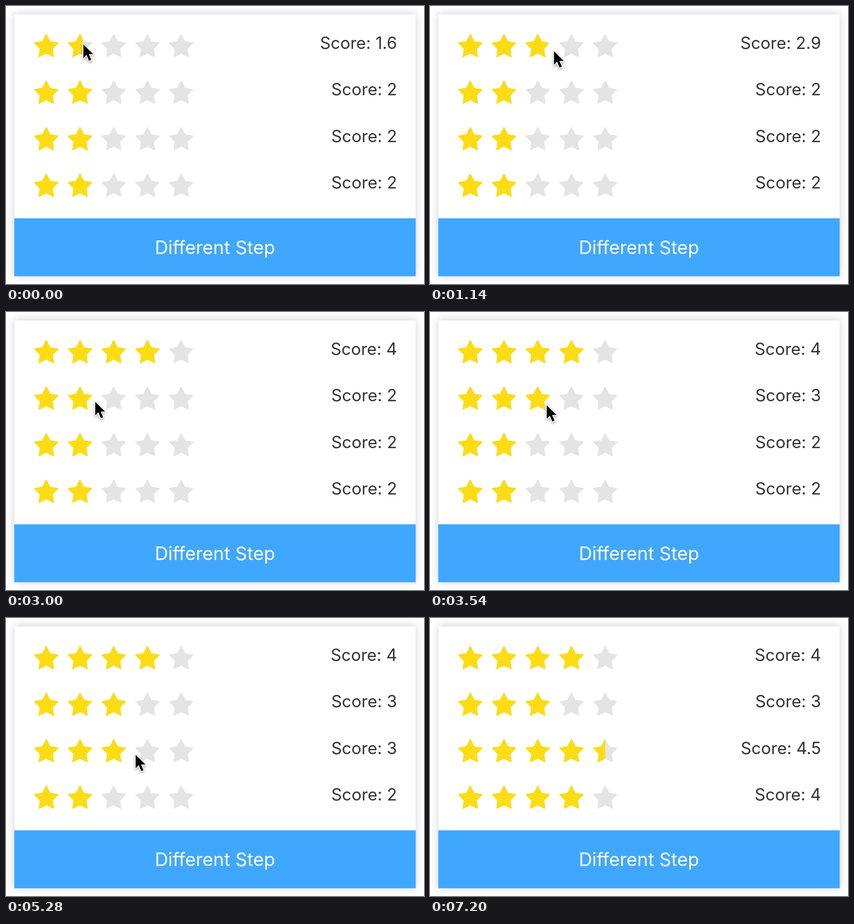
An HTML page for the animation above (7.26 s loop, 740 px wide and 492 px high).

```html
<!DOCTYPE html>
<html lang="en">
<head>
<meta charset="utf-8">
<title>Star rating steps</title>
<style>
  html, body { margin: 0; width: 100%; height: 100%; overflow: hidden; background: #fff; }
  svg { display: block; font-family: Inter, Roboto, sans-serif; }
  .card { fill: #fff; filter: drop-shadow(0 -1px 8px rgba(0, 0, 0, .18)); }
  .star { stroke-width: 2; stroke-linejoin: round; }
  .empty { fill: #e4e4e4; stroke: #e4e4e4; }
  .full { fill: #fddc14; stroke: #fddc14; }
  .score { font-size: 29.6px; fill: #333; text-anchor: end; }
  .label { font-size: 32.7px; fill: #fff; text-anchor: middle; }
  .cursor { fill: #000; stroke: #fff; stroke-width: 3; paint-order: stroke; stroke-linejoin: round;
            filter: drop-shadow(0 2px 2px rgba(0, 0, 0, .35)); }
</style>
</head>
<body>
<svg width="740" height="492" viewBox="0 0 740 492">
  <rect class="card" x="15" y="15" width="710" height="463"/>
  <rect x="14.6" y="375.7" width="710.8" height="102.6" fill="#40a7ff"/>
  <text class="label" x="370" y="439">Different Step</text>
  <g id="rows"></g>
  <path id="cursor" class="cursor" d="M2 2V26L7.5 20.5L12 31L16 29.3L11.6 19.2H19.4Z"/>
</svg>
<script>
const LOOP = 7260, TICK = 60;
const LEFT = 49.8, TOP = 50, PITCH = 59.7, ROW = 82.35, SIZE = 43;
const steps = [0.1, 1, 0.5, 2];

// Turning points of the pointer: time, x, y
const path = [
  [0, 135, 66], [1080, 207, 77], [1140, 217.5, 78], [2160, 284.5, 85],
  [2280, 284, 96], [2760, 165, 128], [3000, 156, 157], [3900, 237, 167],
  [4020, 211, 171], [4080, 204, 184], [4260, 204, 184], [4320, 186, 190],
  [5280, 227.5, 240], [6000, 299, 248], [6240, 299, 248], [6600, 268, 300],
  [6960, 250, 460], [LOOP, 246, 502]
];

function pointer(t) {
  const i = path.findIndex(p => p[0] > t);
  const [t0, x0, y0] = path[i - 1], [t1, x1, y1] = path[i];
  const k = (t - t0) / (t1 - t0);
  return [x0 + (x1 - x0) * k, y0 + (y1 - y0) * k];
}

// Score of the row under the pointer, rounded up to its step
function hover(scores, x, y) {
  const row = Math.floor((y - TOP) / ROW), star = Math.floor((x - LEFT) / PITCH);
  const dx = x - LEFT - star * PITCH, dy = y - TOP - row * ROW;
  if (row < 0 || row > 3 || star < 0 || star > 4 || dx > SIZE || dy > SIZE) return scores;
  const value = Math.ceil((star + dx / SIZE) / steps[row]) * steps[row];
  return scores.map((s, i) => i === row ? +value.toFixed(1) : s);
}

// Scores depend on where the pointer has been, so each tick is worked out in order
const ticks = [];
for (let t = 0, scores = steps.map(() => 2); t < LOOP; t += TICK) {
  const [x, y] = pointer(t);
  scores = hover(scores, x, y);
  ticks.push({ x, y, scores });
}

const starPoints = cx => Array.from({ length: 10 }, (_, i) => {
  const r = i % 2 ? 11 : 21.5, a = i * Math.PI / 5;
  return `${(cx + r * Math.sin(a)).toFixed(2)},${(22.2 - r * Math.cos(a)).toFixed(2)}`;
}).join(" ");
const stars = Array.from({ length: 5 }, (_, i) =>
  `<polygon points="${starPoints(SIZE / 2 + i * PITCH)}"/>`).join("");

rows.innerHTML = steps.map((_, i) => `
  <g transform="translate(${LEFT} ${TOP + i * ROW})">
    <clipPath id="clip${i}"><rect y="-2" height="48"/></clipPath>
    <g class="star empty">${stars}</g>
    <g class="star full" clip-path="url(#clip${i})">${stars}</g>
    <text class="score" x="${692.3 - LEFT}" y="26"></text>
  </g>`).join("");
const fills = rows.querySelectorAll("clipPath rect");
const labels = rows.querySelectorAll("text");

function draw() {
  const { x, y, scores } = ticks[Math.floor(performance.now() % LOOP / TICK)];
  cursor.setAttribute("transform", `translate(${x} ${y})`);
  scores.forEach((score, i) => {
    const whole = Math.floor(score);
    fills[i].setAttribute("width", whole * PITCH + (score - whole) * SIZE);
    labels[i].textContent = "Score: " + score;
  });
  requestAnimationFrame(draw);
}
draw();
</script>
</body>
</html>
```
